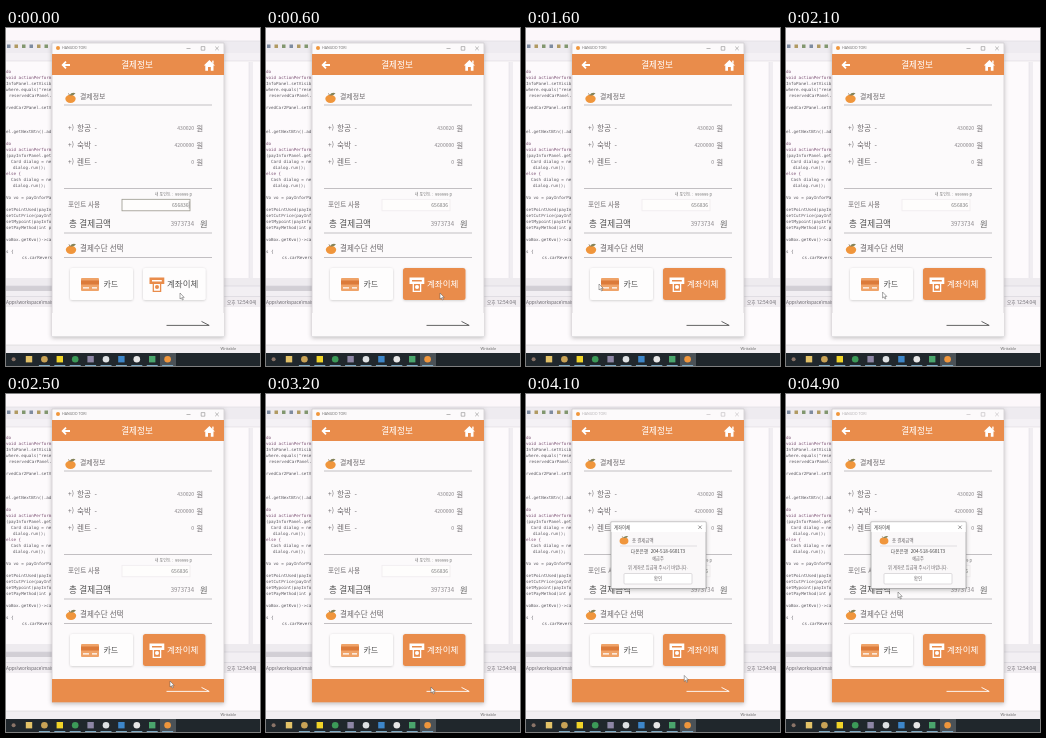
An HTML page that plays this animation: 254x338 px, repeating every 5 s.

```html
<!DOCTYPE html>
<html lang="ko">
<head>
<meta charset="utf-8">
<title>결제정보</title>
<style>
html, body { margin: 0; width: 100%; height: 100%; overflow: hidden; background: #fff; }
svg { display: block; width: 100vw; height: 100vh; }
text { font-family: "Noto Sans CJK KR", "Noto Sans CJK", sans-serif; font-weight: 300; white-space: pre; }
.code { font-family: "DejaVu Sans Mono", "Noto Sans Mono", monospace; font-weight: 400; }
.ui { font-family: "Open Sans", "Noto Sans CJK KR", sans-serif; font-weight: 400; }
</style>
</head>
<body>
<svg id="stage" viewBox="0 0 254 338" preserveAspectRatio="none">
  <defs>
    <filter id="soft" x="-20%" y="-20%" width="140%" height="150%">
      <feDropShadow dx="0" dy="0.6" stdDeviation="1.2" flood-color="#000" flood-opacity=".2"/>
    </filter>
    <filter id="deep" x="-20%" y="-20%" width="140%" height="150%">
      <feDropShadow dx="0" dy="1.2" stdDeviation="2.2" flood-color="#000" flood-opacity=".25"/>
    </filter>
  </defs>
</svg>
<script>
const NS = 'http://www.w3.org/2000/svg';
const stage = document.getElementById('stage');
const ORANGE = '#e98c4b', INK = '#6b676a', RULE = '#aaa6ab', PAPER = '#fcfafb', LOOP = 5000;

function add(tag, attrs, parent = stage) {
  const el = document.createElementNS(NS, tag);
  for (const k in attrs) el.setAttribute(k, attrs[k]);
  return parent.appendChild(el);
}
const group = (parent = stage, attrs = {}) => add('g', attrs, parent);
const box = (p, x, y, width, height, fill, more = {}) =>
  add('rect', { x, y, width, height, fill, ...more }, p);
const dot = (p, cx, cy, r, fill) => add('circle', { cx, cy, r, fill }, p);
const path = (p, d, stroke, width = .7, fill = 'none') =>
  add('path', { d, stroke, 'stroke-width': width, fill }, p);
const rule = (p, y) => path(p, `M58 ${y}H206`, RULE, .7);
// y is the vertical centre of the line
function label(p, str, x, y, size, fill = INK, more = {}) {
  const el = add('text', { x, y: y + size * .36, 'font-size': size, fill, ...more }, p);
  el.textContent = str;
  return el;
}
const END = { 'text-anchor': 'end' }, MID = { 'text-anchor': 'middle' };

function fruit(p, x, y, scale = 1) {
  const g = group(p, { transform: `translate(${x} ${y}) scale(${scale})` });
  add('ellipse', { cx: 0, cy: .8, rx: 5.2, ry: 4.1, fill: '#f0963c' }, g);
  path(g, 'M-1 -2.8Q1 -6 5 -4.8Q3 -2 -1 -2.8Z', 'none', 0, '#85845a');
  path(g, 'M-1 -2.8L-2 -4.6', '#7d6c4c', .8);
}

function desktop() {
  const g = group();
  box(g, 0, 0, 254, 338, '#fdfafc');
  box(g, 0, 0, 254, 13, '#fcf7fa');
  box(g, 0, 13, 254, 12, '#eeebf0');
  box(g, 0, 25, 254, 8, '#f4f1f5');
  path(g, 'M0 13H254M0 33H254', '#dcd8de', .6);
  for (let i = 0; i < 6; i++) box(g, 1 + i * 7.5, 16.5, 3.5, 3.5, ['#7e8ba0', '#b09a62', '#82976f'][i % 3]);
  const code = [
    [43, 0, 'do'], [49, 0, 'void actionPerform'], [55, 0, 'InfoPanel.setVisib'],
    [61, 0, 'where.equals("rese'], [67, 3, 'reservedCarPanel.'], [79, 0, 'rvedCar2Panel.setV'],
    [103, 0, 'el.getNextBtn().ad'], [115, 0, 'do'], [121, 0, 'void actionPerform'],
    [127, 0, '(payInforPanel.get'], [133, 5, 'Card dialog = ne'], [139, 7, 'dialog.run();'],
    [145, 0, 'else {'], [151, 5, 'Cash dialog = ne'], [157, 7, 'dialog.run();'],
    [169, 0, 'Vo vo = payInforPa'], [181, 0, 'setPointUsed(payIn'], [187, 0, 'setCutPrice(payInf'],
    [193, 0, 'setMypoint(payInfo'], [199, 0, 'setPayMethod(int p'], [211, 0, 'voBox.getKvo()->ca'],
    [223, 0, 's {'], [229, 16, 'cs.carReverse(vo']
  ];
  for (const [y, x, s] of code) {
    const key = /^(do|void|else)/.test(s);
    label(g, s, x, y, 4.2, key ? '#7b5073' : '#5a585f', { class: 'code' });
  }
  box(g, 243, 34, 4, 216, '#f0edf1');
  path(g, 'M243 34V250', '#dedae0', .5);
  box(g, 0, 250, 254, 8, '#eeebef');
  box(g, 0, 258, 254, 11, '#f2eff3');
  box(g, 0, 258, 46, 5, '#d2cfd5');
  path(g, 'M0 258H254M0 268.5H254', '#d6d2d9', .6);
  box(g, 0, 269, 254, 10, '#f1edf1');
  label(g, 'Apps\\workspace\\main', 0, 274, 4.6, '#66636a', { class: 'ui' });
  label(g, '오후 12:54:04)', 221, 274, 4.6, '#66636a', { class: 'ui' });
  box(g, 0, 279, 254, 38, '#fefbfd');
  box(g, 0, 317, 254, 8, '#f1eef1');
  path(g, 'M0 317H254', '#d6d3d6', .6);
  label(g, 'Writable', 214.5, 321, 4, '#666', { class: 'ui' });
}

function taskbar() {
  const g = group();
  box(g, 0, 325, 254, 13, '#20272c');
  box(g, 154, 325, 16, 13, '#4b5257');
  const colors = ['#8a7468', '#e3c268', '#c9a356', '#f0d428', '#3c9a58', '#8d86a5',
    '#dde1e3', '#3d86c9', '#e6e6e6', '#4aa56c', '#f0963c'];
  colors.forEach((c, i) => {
    const x = 7.6 + i * 15.4;
    if (i % 2) box(g, x - 3.2, 328, 6.4, 6.4, c); else dot(g, x, 331.3, i ? 3.3 : 2, c);
    if (i > 1) box(g, x - 5.5, 337, 11, 1, '#7ca9c4');
  });
}

function amount(p, str, y, size = 5) {
  label(p, str, 188, y, size, '#8a868a', END);
}

function cardIcon(p) {
  box(p, 75, 250, 18, 13, '#efa368', { rx: 1 });
  box(p, 75, 252.5, 18, 4, '#dc7b3a');
  path(p, 'M77 259.8H83M86 259.8H91', '#fff', 1.2);
}

function atmIcon(p) {
  path(p, 'M143.5 249.5H158.3V256H143.5Z M146 252H155.8V253.4H146Z', 'none', 0, 'currentColor')
    .setAttribute('fill-rule', 'evenodd');
  path(p, 'M147.3 254.5V263.4H154.6V254.5', 'currentColor', 1.3);
  dot(p, 151, 259, 2, 'currentColor');
}

function appWindow() {
  const g = group();
  box(g, 46, 15, 172, 293.5, PAPER, { stroke: '#c2bec4', 'stroke-width': .6, filter: 'url(#deep)' });
  dot(g, 52, 20, 2, '#f0963c');
  const title = label(g, 'HANUDO TORI', 56, 20.2, 3.6, '#666', { class: 'ui' });
  const marks = path(g, 'M180.5 20.5H184.5M195.2 18.6H198.8V22.2H195.2ZM209.2 18.6L212.8 22.2M212.8 18.6L209.2 22.2', '#777', .5);

  box(g, 46, 26, 172, 21, ORANGE);
  path(g, 'M64 37H57M60 33.7L56.7 37L60 40.3', '#fff', 1.8);
  label(g, '결제정보', 131, 37, 8.6, '#fff', MID);
  path(g, 'M197.8 37.6L203.4 32L209 37.6H207.5V42.8H204.8V39H202V42.8H199.3V37.6Z', 'none', 0, '#fff');
  box(g, 206.2, 32.6, 1.4, 3, '#fff');

  fruit(g, 64.5, 70);
  label(g, '결제정보', 74, 69, 6.9);
  rule(g, 77);

  [['항공', '430020', 100], ['숙박', '4200000', 117], ['렌트', '0', 134]].forEach(([name, value, y]) => {
    label(g, '+)', 62, y, 6.6);
    label(g, name, 71, y, 7.6);
    label(g, '-', 88.5, y, 7);
    amount(g, value, y);
    label(g, '원', 190.5, y, 7.2);
  });

  rule(g, 160.5);
  label(g, '내 포인트 :  999999 p', 186, 166.5, 4, '#777', END);
  label(g, '포인트 사용', 62, 177, 6.6);
  const field = box(g, 116, 171.3, 68, 11.5, '#fefdfc', { 'stroke-width': .8 });
  const points = label(g, '656836', 182.3, 177, 5, '#777', END);
  const caret = path(g, 'M183.2 173.5V180.5', '#666', .5);
  label(g, '총 결제금액', 63, 196, 8.6, '#555', { 'font-weight': 400 });
  amount(g, '3973734', 196, 6);
  label(g, '원', 194, 196, 8.2, '#5c5c5c');
  rule(g, 205);

  fruit(g, 65, 221);
  label(g, '결제수단 선택', 74, 220, 7.5);
  rule(g, 229.5);

  box(g, 64, 240, 63, 32, '#fefdfd', { rx: 2.5, filter: 'url(#soft)' });
  cardIcon(g);
  label(g, '카드', 97.5, 256.3, 8, '#555');
  const account = box(g, 137, 240, 62.5, 32, '#fefdfd', { rx: 2.5, filter: 'url(#soft)' });
  const atm = group(g);
  atmIcon(atm);
  const accountText = label(g, '계좌이체', 161, 256.3, 8.5, '#555', { 'font-weight': 400 });

  const footer = box(g, 46, 285, 172, 23.3, ORANGE);
  const arrow = path(g, 'M160.5 297.4H203.2L195.5 293.4', '#fff', .9);
  return { title, marks, field, points, caret, account, atm, accountText, footer, arrow };
}

function makeDialog() {
  const g = group();
  box(g, 85, 128, 95, 66.5, '#faf8f9', { stroke: '#8b8b8b', 'stroke-width': .6, filter: 'url(#deep)' });
  box(g, 85.3, 128.3, 94.4, 9.7, '#fff');
  label(g, '계좌이체', 88, 133, 4.4, '#444', { class: 'ui' });
  path(g, 'M172.3 131.5L175.7 134.9M175.7 131.5L172.3 134.9', '#555', .6);
  fruit(g, 98, 146.3, .85);
  label(g, '총 결제금액', 106, 146.3, 4.4);
  path(g, 'M94 152H171', '#c4c0c4', .5);
  label(g, '다온은행  204-518-660173', 132, 157.5, 4.7, '#444', { ...MID, 'font-weight': 400 });
  label(g, '예금주', 132, 164, 4.2, INK, MID);
  label(g, '위 계좌로 입금해 주시기 바랍니다.', 132, 173.5, 4.2, INK, MID);
  box(g, 98, 179.5, 68, 10.5, '#fff', { rx: 1, stroke: '#c9c6c9', 'stroke-width': .6 });
  label(g, '확인', 132, 184.7, 4.6, INK, MID);
  return g;
}

desktop();
taskbar();
const ui = appWindow();
const dialog = makeDialog();
const pointer = path(stage, 'M0 0V6L1.4 4.8L2.4 7L3.3 6.6L2.4 4.4H4.2Z', '#555', .5, '#fff');

// time, x, y
const route = [
  [0, 174, 265], [600, 174, 265], [1100, 166, 293], [1200, 166, 293], [1600, 73, 256],
  [1900, 73, 256], [2500, 164, 287], [2800, 165, 293], [4000, 165, 293],
  [4600, 74, 137], [4900, 112, 198], [5000, 112, 198]
];
const ease = u => u * u * (3 - 2 * u);

function pointerAt(t) {
  const i = Math.max(1, route.findIndex(p => p[0] > t));
  const [t0, x0, y0] = route[i - 1], [t1, x1, y1] = route[i];
  const u = ease((t - t0) / (t1 - t0));
  return [x0 + (x1 - x0) * u, y0 + (y1 - y0) * u];
}
const show = (el, on) => el.setAttribute('visibility', on ? 'visible' : 'hidden');

function draw(t) {
  const chosen = t >= 300;
  const hover = (t >= 1000 && t < 1300) || t >= 2500;
  const inactive = t >= 3500;
  ui.title.setAttribute('fill', inactive ? '#b0adb0' : '#666');
  ui.marks.setAttribute('stroke', inactive ? '#b0adb0' : '#777');
  ui.field.setAttribute('stroke', chosen ? '#efecee' : '#99978c');
  ui.points.setAttribute('x', chosen ? 182 : 182.6);
  show(ui.caret, !chosen);
  ui.account.setAttribute('fill', chosen ? ORANGE : '#fefdfd');
  ui.atm.setAttribute('color', chosen ? '#fff' : ORANGE);
  ui.accountText.setAttribute('fill', chosen ? '#fff' : '#555');
  ui.footer.setAttribute('fill', hover ? ORANGE : PAPER);
  ui.arrow.setAttribute('stroke', hover ? '#fff' : '#555');
  show(dialog, t >= 3700);
  pointer.setAttribute('transform', `translate(${pointerAt(t).join(' ')})`);
}

const start = performance.now();
function tick() {
  const t = (performance.now() - start) % LOOP;
  draw(Math.floor(t / 100) * 100);
  requestAnimationFrame(tick);
}
tick();
</script>
</body>
</html>
```
